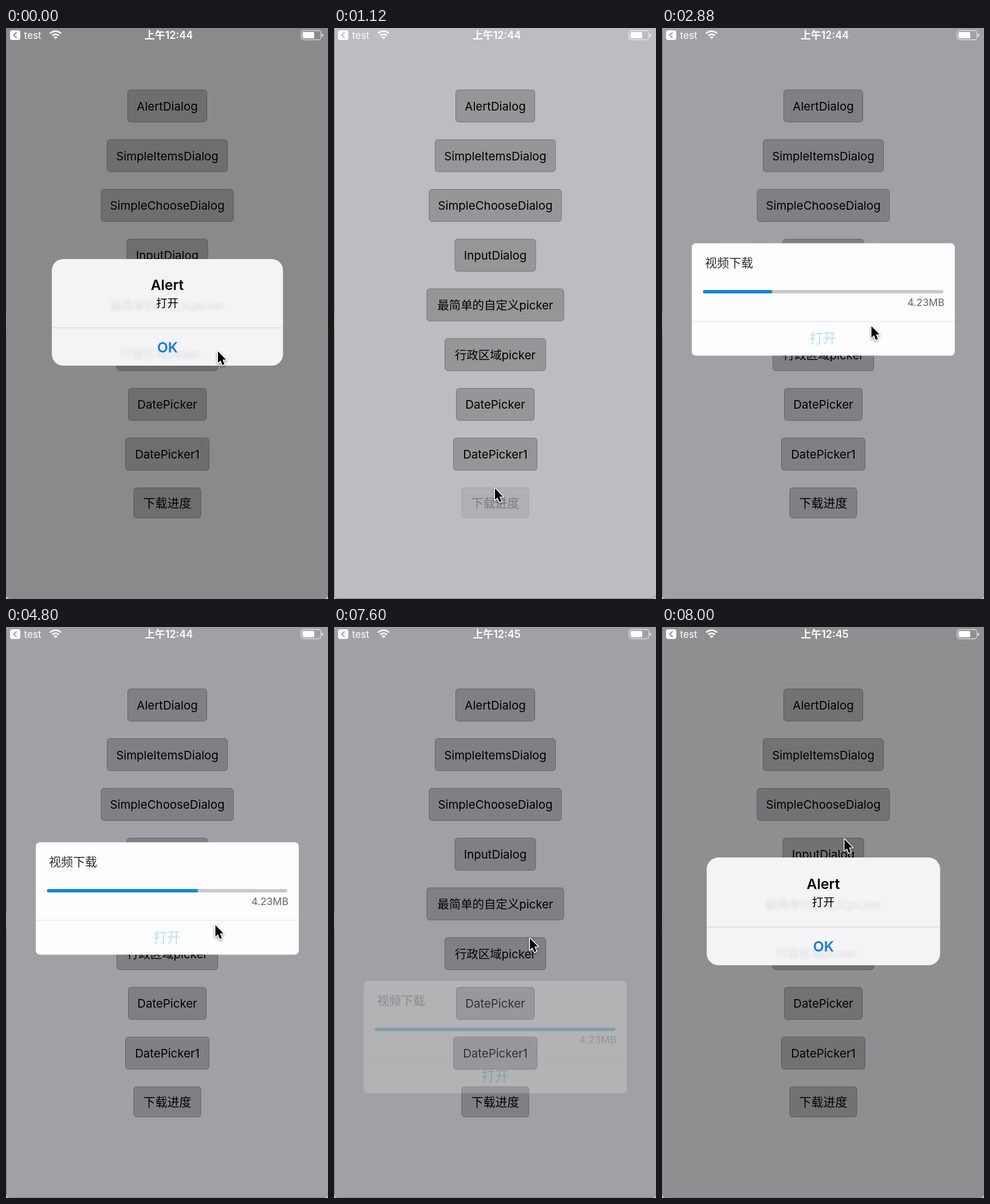
Recreate the animation shown at these times as an HTML page. Size 562 by 996 pixels, loop 8040 ms.

```html
<!DOCTYPE html>
<html lang="zh-CN">
<head>
<meta charset="utf-8">
<style>
html, body { margin: 0; width: 100%; height: 100%; overflow: hidden; background: #c4c3c6; }
svg { display: block; font-family: Inter, "Noto Sans CJK SC", "Noto Sans CJK", sans-serif; }
.mid { text-anchor: middle; }
.ghost { fill: #000; opacity: .09; filter: blur(2.5px); font-size: 20.4px; }
.bold { font-weight: 600; font-size: 24.4px; }
</style>
</head>
<body>
<svg width="562" height="996" viewBox="0 0 562 996">
  <rect width="562" height="995.5" rx="8" fill="#e6e5ea"/>
  <rect width="562" height="20" fill="#e6e5ea"/>
  <g id="buttons"></g>
  <path id="dim" d="M0 0H562V987.5a8 8 0 0 1-8 8H8a8 8 0 0 1-8-8z"/>

  <g id="dialog">
    <rect x="52" y="375.5" width="459" height="196" rx="7" fill="#fefdff"/>
    <text x="75" y="417" font-size="21" fill="#2c2c2e">视频下载</text>
    <rect x="71.5" y="457" width="419.5" height="6" rx="3" fill="#c9c8cd"/>
    <rect id="bar" x="71.5" y="457" height="6" rx="3" fill="#1488d0"/>
    <text x="493" y="484.5" font-size="17.6" fill="#666568" text-anchor="end">4.23MB</text>
    <path d="M52 511.5H511" stroke="#e1e0e5"/>
    <text id="open" class="mid" x="281" y="550" font-size="23.5">打开</text>
  </g>

  <g id="alert">
    <rect x="80" y="403" width="403.5" height="186" rx="20" fill="#f4f3f6"/>
    <text class="mid ghost" x="282" y="492">最简单的自定义picker</text>
    <text class="mid ghost" x="270" y="576">行政区域picker</text>
    <path d="M80 523H483.5" stroke="#cfced2"/>
    <text class="mid bold" x="281.5" y="457">Alert</text>
    <text class="mid" x="281.5" y="487" font-size="19.5">打开</text>
    <text class="mid bold" x="282" y="565.5" fill="#0b78f3">OK</text>
  </g>

  <g fill="#fff">
    <path fill-rule="evenodd" d="M11 4h10a4 4 0 0 1 4 4v9a4 4 0 0 1-4 4H11a4 4 0 0 1-4-4V8a4 4 0 0 1 4-4zM17.8 7l1.5 1.4-4.2 4.1 4.2 4.1-1.5 1.4-5.6-5.5z"/>
    <text x="31.5" y="19" font-size="17.2">test</text>
    <path d="M86.500 19.500l-3.500-3.500a5 5 0 0 1 7 0z"/>
    <path d="M80.800 13.300a8 8 0 0 1 11.400 0M77 9.500a13.400 13.400 0 0 1 19 0" fill="none" stroke="#fff" stroke-width="2.800"/>
    <text id="clock" class="mid" x="284" y="19" font-size="18" font-weight="600"></text>
    <rect x="515" y="4.500" width="34.500" height="16" rx="4" fill="none" stroke="#fff" stroke-opacity=".65" stroke-width="1.300"/>
    <rect x="517.500" y="7" width="20.500" height="11" rx="2"/>
    <path d="M551 10a2.600 2.600 0 0 1 0 5.500z" opacity=".7"/>
  </g>

  <path d="M.5 0V988M8 995.500H554M.5 988a7.500 7.500 0 0 0 7.500 7.500M554 995.500a7.500 7.500 0 0 0 7.500-7.500" fill="none" stroke="#7d7c7f"/>
  <path d="M.5 497v30" stroke="#86a676"/>
  <path id="cursor" d="M0 0V20L4.600 16L7.600 24L11.200 22.500L8 14.600L14 14.400Z" stroke="#fff" stroke-width="3" stroke-linejoin="round" paint-order="stroke" style="filter:drop-shadow(0 2px 2px rgba(0,0,0,.4))"/>
</svg>
<script>
const LOOP = 8040, STEP = 40;
const $ = id => document.getElementById(id);
const clamp = x => Math.min(1, Math.max(0, x));
const ramp = (t, from, to) => clamp((t - from) / (to - from));
const easeOut = u => 1 - (1 - u) ** 3;
const easeInOut = u => u < .5 ? 2 * u * u : 1 - 2 * (1 - u) ** 2;

// label, width
const labels = [
  ['AlertDialog', 139], ['SimpleItemsDialog', 211], ['SimpleChooseDialog', 232],
  ['InputDialog', 142], ['最简单的自定义picker', 240], ['行政区域picker', 177],
  ['DatePicker', 137], ['DatePicker1', 147], ['下载进度', 118]
];
$('buttons').innerHTML = labels.map(([label, w], i) => {
  const last = i === labels.length - 1, y = 108 + i * 86.75, h = last ? 53 : 56.5;
  return `<g${last ? ' id="download"' : ''}>
    <rect x="${282 - w / 2}" y="${y}" width="${w - 1}" height="${h - .5}" rx="5" fill="#b9b6bb" stroke="#8e8c8f"/>
    <text class="mid" x="281.5" y="${y + h / 2 + 7.6}" font-size="${last ? 21 : 20.4}">${label}</text></g>`;
}).join('');

// time, x, y
const path = [
  [120, 370, 564], [820, 281, 803], [1180, 281, 803], [1720, 350, 548],
  [2480, 365.5, 520], [6920, 365.5, 520], [7360, 342, 543], [7620, 342, 543], [8040, 318, 367]
];

function cursorAt(t) {
  let i = path.findIndex(p => p[0] > t);
  if (i < 1) i = 1;
  const [a, b] = [path[i - 1], path[i]];
  const u = easeInOut(ramp(t, a[0], b[0]));
  return [a[1] + (b[1] - a[1]) * u, a[2] + (b[2] - a[2]) * u];
}

function draw(t) {
  const closing = t > 4000;
  const alertIn = easeOut(ramp(t, 7720, 8160));
  const alert = closing ? alertIn : 1 - ramp(t, 80, 330);
  const overlay = ramp(t, 970, 1220) * (1 - ramp(t, 7640, 7840));
  $('dim').setAttribute('opacity', 1 - (1 - .4 * alert) * (1 - .3 * overlay));

  const scale = closing ? 1 + .2 * (1 - alertIn) : 1;
  $('alert').setAttribute('opacity', closing ? ramp(t, 7720, 7880) : alert);
  $('alert').setAttribute('transform', `translate(281.75 496) scale(${scale}) translate(-281.75 -496)`);

  const shown = closing ? 1 - easeInOut(ramp(t, 7527, 7633)) : easeInOut(ramp(t, 1200, 1400));
  $('dialog').setAttribute('opacity', shown);
  $('dialog').setAttribute('transform', `translate(0 ${300 * (1 - shown)})`);

  const progress = ramp(t, 1247, 6900);
  $('bar').setAttribute('width', 419.5 * progress);
  $('open').setAttribute('fill', progress < 1 ? '#b7e0f0' : '#1097d5');

  const press = ramp(t, 930, 1000) * (1 - ramp(t, 1080, 1320));
  $('download').setAttribute('opacity', 1 - .8 * press);
  $('clock').textContent = t < 7200 ? '上午12:44' : '上午12:45';
  $('cursor').setAttribute('transform', `translate(${cursorAt(t)})`);
}

const start = performance.now();
function tick() {
  const t = (performance.now() - start) % LOOP;
  draw(Math.floor(t / STEP) * STEP);
  requestAnimationFrame(tick);
}
tick();
</script>
</body>
</html>
```
